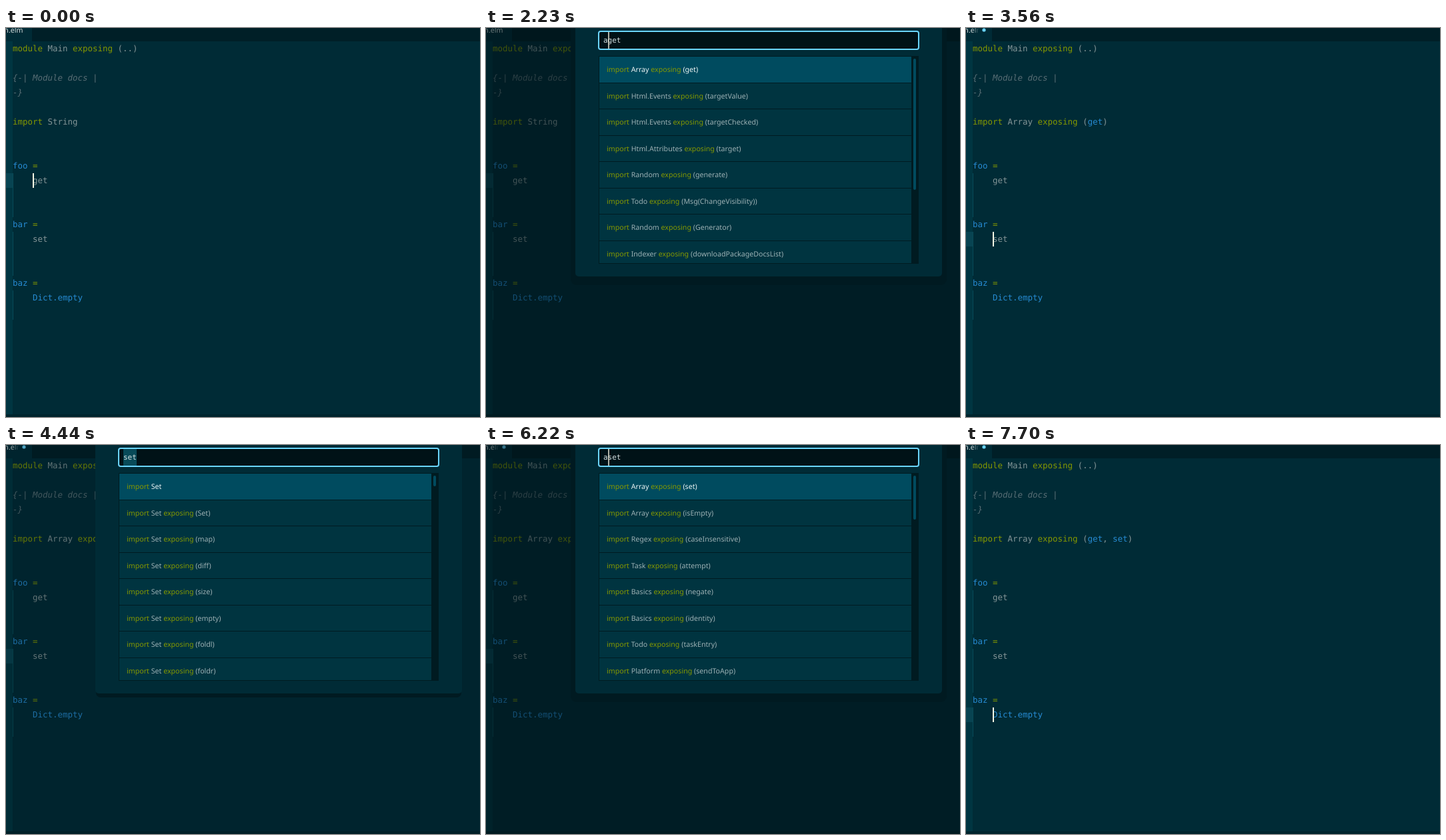
Write an HTML page that moves like this. It is 711 by 584 pixels and loops after 8 s.

```html
<!DOCTYPE html>
<html lang="en">
<head>
<meta charset="utf-8">
<title>Adding imports in an editor</title>
<style>
  html, body { margin: 0; width: 100%; height: 100%; overflow: hidden; background: #002b36; }
  svg { display: block; }
  text { white-space: pre; text-rendering: geometricPrecision; }
  .code { font: 12.46px "DejaVu Sans Mono", monospace; fill: #839496; }
  .ui { font: 10.65px "Noto Sans", sans-serif; fill: #9db1b4; }
  .query { font: 11px "DejaVu Sans Mono", monospace; fill: #d3dfe0; }
  .k { fill: #859900; }
  .b { fill: #268bd2; }
  .c { fill: #586e75; font-style: italic; }
  .picked { fill: #edf5f5; }
  .caret { fill: #fdf6e3; }
</style>
</head>
<body>
<svg width="711" height="584" viewBox="0 0 711 584">
  <defs>
    <linearGradient id="fade">
      <stop offset="0" stop-color="#002b36" stop-opacity="0"/>
      <stop offset="1" stop-color="#002b36"/>
    </linearGradient>
    <clipPath id="listClip"><rect x="169" y="42" width="480" height="311"/></clipPath>
  </defs>

  <rect width="711" height="584" fill="#002b36"/>
  <rect y="20" width="10" height="560" fill="#003541"/>
  <rect id="gutter" width="10" height="22" fill="#084452"/>
  <rect width="711" height="20" fill="#001f27"/>
  <rect width="39" height="20" fill="#002b36"/>
  <rect y="580" width="711" height="4" fill="#00242d"/>
  <text class="ui" x="25.5" y="7" text-anchor="end" style="fill:#d5dddd">Main.elm</text>
  <g id="dirty">
    <rect x="9" width="11" height="12" fill="url(#fade)"/>
    <rect x="19.5" width="19" height="12" fill="#002b36"/>
    <circle cx="27" cy="3" r="2.6" fill="#6bd5ff"/>
  </g>
  <path d="M10.5 218V284M10.5 306V372M10.5 394V438" stroke="#084a57"/>
  <g id="code" class="code"></g>
  <rect id="caret" class="caret" width="2" height="22"/>

  <g id="modal">
    <rect id="dim" width="711" height="584" fill="#001014"/>
    <rect id="shadow" y="-20" fill="#001a21"/>
    <rect x="134" y="-20" width="550" height="393" rx="5" fill="#002b36"/>
    <rect x="169" y="5" width="480" height="27" rx="3" fill="#001217" stroke="#6bd5ff" stroke-width="2"/>
    <rect id="selection" x="176" y="6" width="20" height="25" fill="#084a58"/>
    <text id="query" class="query" x="176" y="22"></text>
    <rect id="queryCaret" class="caret" y="6" width="2" height="25"/>
    <rect x="169" y="42" width="480" height="312" fill="#001b21"/>
    <g id="list" clip-path="url(#listClip)"></g>
    <rect id="thumb" x="641" y="46" width="4" rx="2" fill="#004b5f"/>
  </g>
</svg>
<script>
const LOOP = 8000;
const el = id => document.getElementById(id);
const set = (id, attrs) => {
  for (const name in attrs) el(id).setAttribute(name, attrs[name]);
};
const show = (id, on) => set(id, { visibility: on ? 'inherit' : 'hidden' });

// Each track holds [start, ...values] steps; the latest one begun applies.
const at = (track, t) => track.filter(step => step[0] <= t).pop().slice(1);

// start, column, line, opacity
const carets = [
  [0, 4, 9, 1], [150, 4, 9, .5], [300, 4, 9, 0], [590, 4, 9, .5], [740, 4, 9, 0],
  [2970, 4, 9, 1], [3260, 0, 10, 1], [3410, 0, 11, 1], [3560, 4, 13, 1],
  [4150, 4, 13, .5], [4290, 4, 13, 0], [6370, 4, 13, 1], [6820, 4, 13, .5],
  [6970, 4, 13, 0], [7260, 0, 14, 1], [7410, 0, 15, 1], [7550, 4, 16, 1], [7700, 4, 17, 1]
];
const dims = [[0, 0], [590, .25], [740, .5], [2970, 0], [4440, .25], [4580, .5], [6370, 0]];
const queries = [[0, 'get'], [1780, 'aget'], [4440, 'set'], [5330, 'aset']];
const selections = [[0, true], [1640, false], [4440, true], [5180, false]];
const queryCarets = [
  [0, 0], [1640, 1], [2230, .7], [2380, 0], [2670, .5], [2820, 1],
  [4440, 0], [5180, 1], [5630, .7], [5780, 0], [6080, .5], [6220, .7]
];
const imports = [
  [0, 'String'],
  [3110, 'Array ~exposing~ (`get`)'],
  [6520, 'Array ~exposing~ (`get`, `set`)']
];

const results = {
  get: [35, 'Dict (get)', 'Http (get)', 'Array (get)', 'Http (getString)',
    'Indexer (getLastName)', 'Indexer (getLocalName)', 'Indexer (getModuleName)',
    'Html.Attributes (target)'],
  aget: [197, 'Array (get)', 'Html.Events (targetValue)', 'Html.Events (targetChecked)',
    'Html.Attributes (target)', 'Random (generate)', 'Todo (Msg(ChangeVisibility))',
    'Random (Generator)', 'Indexer (downloadPackageDocsList)'],
  set: [16, 'Set', 'Set (Set)', 'Set (map)', 'Set (diff)', 'Set (size)', 'Set (empty)',
    'Set (foldl)', 'Set (foldr)'],
  aset: [66, 'Array (set)', 'Array (isEmpty)', 'Regex (caseInsensitive)', 'Task (attempt)',
    'Basics (negate)', 'Basics (identity)', 'Todo (taskEntry)', 'Platform (sendToApp)']
};

// ~keyword~, `name` and ^comment^ become coloured spans.
const paint = s => s
  .replace(/~(.+?)~/g, '<tspan class="k">$1</tspan>')
  .replace(/`(.+?)`/g, '<tspan class="b">$1</tspan>')
  .replace(/\^(.+?)\^/g, '<tspan class="c">$1</tspan>');

const codeLines = imported => [
  [0, 0, '~module~ Main ~exposing~ (..)'],
  [2, 0, '^{-| Module docs |^'],
  [3, 0, '^-}^'],
  [5, 0, '~import~ ' + imported],
  [8, 0, '`foo` ~=~'], [9, 4, 'get'],
  [12, 0, '`bar` ~=~'], [13, 4, 'set'],
  [16, 0, '`baz` ~=~'], [17, 4, '`Dict.empty`']
];
const lineTop = line => 20 + 22 * line;
const columnX = column => 10 + 7.5 * column;

const drawCode = imported => codeLines(imported).map(([line, column, s]) =>
  `<text x="${columnX(column)}" y="${lineTop(line) + 15}">${paint(s)}</text>`).join('');

const drawRow = (item, i) => {
  const top = i ? Math.floor(82 + 39.5 * (i - 1)) + 1 : 43;
  const bottom = Math.floor(82 + 39.5 * i);
  const label = paint('~import~ ' + item.replace(' (', ' ~exposing~ ('));
  return `<rect x="170" y="${top}" width="468" height="${bottom - top}" fill="${i ? '#003440' : '#004b5f'}"/>` +
    `<text class="ui ${i ? '' : 'picked'}" x="181" y="${66 + Math.ceil(39.5 * i)}">${label}</text>`;
};

let lastImport, lastQuery;

function render(t) {
  const [column, line, opacity] = at(carets, t);
  set('caret', { x: columnX(column), y: lineTop(line), opacity });
  set('gutter', { y: lineTop(line) });

  const [imported] = at(imports, t);
  if (imported !== lastImport) {
    el('code').innerHTML = drawCode(imported);
    show('dirty', imported !== 'String');
    lastImport = imported;
  }

  const [dim] = at(dims, t);
  show('modal', dim > 0);
  set('dim', { opacity: dim });
  set('shadow', dim < .5
    ? { x: 135, width: 548, height: 399, rx: 7 }
    : { x: 127, width: 564, height: 406, rx: 9 });

  const [query] = at(queries, t);
  if (query !== lastQuery) {
    const [thumb, ...items] = results[query];
    el('query').textContent = query;
    el('list').innerHTML = items.map(drawRow).join('');
    set('thumb', { height: thumb });
    lastQuery = query;
  }
  show('selection', at(selections, t)[0]);
  set('queryCaret', { x: query.length > 3 ? 183 : 176, opacity: at(queryCarets, t)[0] });
}

const start = performance.now();
function tick() {
  render((performance.now() - start) % LOOP);
  requestAnimationFrame(tick);
}
tick();
</script>
</body>
</html>
```
